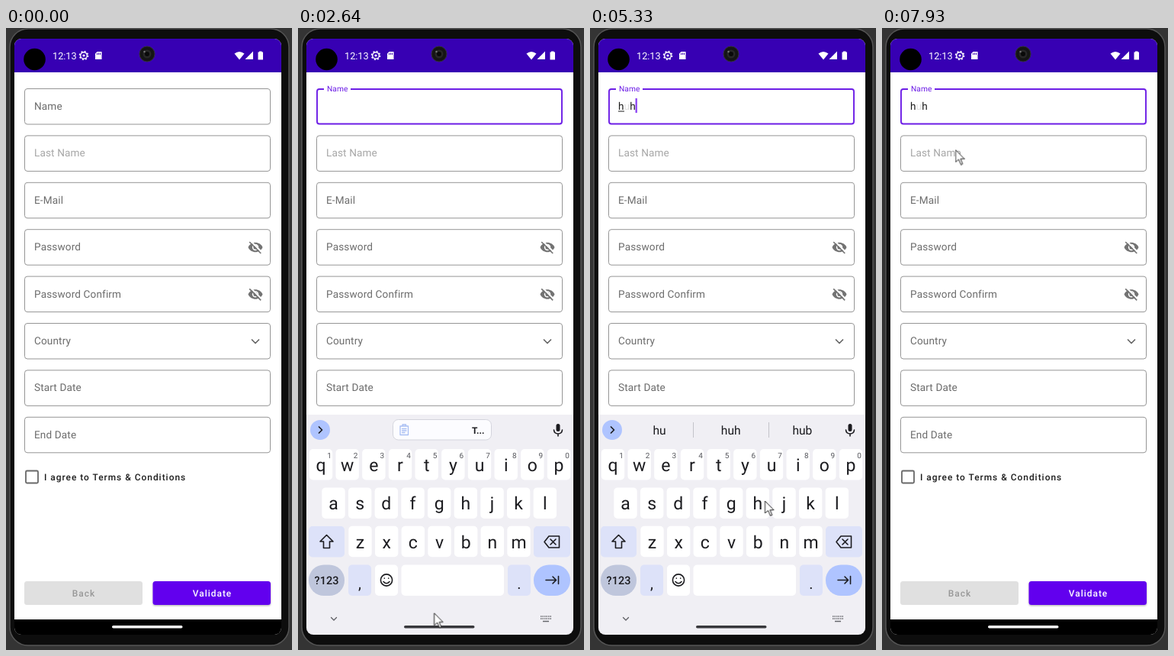
An HTML page for the animation above (8000 ms loop, 375 px wide and 814 px high).

```html
<!DOCTYPE html>
<html lang="en">
<head>
<meta charset="utf-8">
<title>Form validation</title>
<style>
html, body { margin: 0; width: 100%; height: 100%; overflow: hidden; background: #111; }
svg { display: block; width: 100vw; height: 100vh; font: 13.6px Roboto, sans-serif; text-rendering: geometricPrecision; }
text { white-space: pre; }
.label { letter-spacing: .13px; fill: #6c6c6c; }
.button { font-size: 11.9px; font-weight: 500; letter-spacing: 1px; }
.line { fill: none; stroke-linecap: round; stroke-linejoin: round; }
.mid { text-anchor: middle; }
.key { font-size: 23px; fill: #1b1b1f; }
.digit { font-size: 10px; fill: #55565c; }
.hint { font-size: 15.6px; fill: #1b1b1f; }

/* One loop is 8 s, so 1% is 80 ms. */
.anim { animation: 8s linear infinite; }
.step { animation: 8s step-end infinite; }

#cursor { animation-name: cursor; }
@keyframes cursor {
  0%, 6.2% { transform: translate(-40px, 112px); }
  6.25% { transform: translate(13px, 111px); }
  7.1% { transform: translate(82px, 106px); }
  8%, 18.2% { transform: translate(122.5px, 116px); }
  19.4%, 28.5% { transform: translate(110.5px, 112px); }
  32.5% { transform: translate(172px, 788px); }
  36.4%, 39.4% { transform: translate(222px, 618px); }
  41.6% { transform: translate(242px, 589px); }
  43.5%, 55% { transform: translate(239px, 577px); }
  58%, 70% { transform: translate(229.5px, 619px); }
  74.4% { transform: translate(110px, 793px); }
  78.4%, 88.5% { transform: translate(51.5px, 776px); }
  90.4% { transform: translate(60px, 755px); }
  97.3%, 99% { transform: translate(96.5px, 189px); }
  99.1%, 100% { transform: translate(96.5px, 159.5px); }
}
#idle { animation-name: idle; }
@keyframes idle {
  0% { stroke: #959595; opacity: 1; }
  12% { stroke: #686868; opacity: 1; }
  14%, 100% { opacity: 0; }
}
#focus { animation-name: focus; }
@keyframes focus {
  0% { opacity: 0; }
  14%, 100% { opacity: 1; }
}
#focus path { animation-name: outline; }
@keyframes outline {
  0%, 41.6% { stroke: #6d1ee6; }
  43.5%, 63.5% { stroke: #b00020; }
  65.5%, 100% { stroke: #6d1ee6; }
}
#name { animation-name: float; }
@keyframes float {
  0%, 12.6% { transform: translate(37px, 107px); fill: #6c6c6c; animation-timing-function: ease-in-out; }
  14.6%, 41.6% { transform: translate(38px, 83px) scale(.75); fill: #6d1ee6; }
  43.5%, 63.5% { transform: translate(38px, 83px) scale(.75); fill: #b00020; }
  65.5%, 100% { transform: translate(38px, 83px) scale(.75); fill: #6d1ee6; }
}
#caret { animation-name: caret; }
@keyframes caret {
  0% { opacity: 0; transform: none; fill: #6200ee; }
  11.7% { opacity: 1; }
  18.25% { opacity: 0; }
  24.5% { opacity: 1; }
  30.7% { opacity: 0; }
  36.3% { opacity: 1; transform: none; fill: #6200ee; }
  39.2% { opacity: 1; transform: translate(7.5px); fill: #b00020; }
  47.75% { opacity: 0; }
  54% { opacity: 1; transform: translate(7.5px); }
  58.2% { opacity: .15; transform: translate(15px); }
  59.7% { opacity: 1; transform: translate(15px); fill: #b00020; }
  63% { opacity: 1; transform: translate(22.5px); fill: #6200ee; }
  70% { opacity: 0; }
  76.2% { opacity: 1; }
  82.4% { opacity: 0; }
  88.6% { opacity: 1; }
  94.9%, 100% { opacity: 0; transform: translate(22.5px); fill: #6200ee; }
}
#first { animation-name: first; }
@keyframes first { 0% { opacity: 0; } 39.2%, 100% { opacity: 1; } }
#second { animation-name: second; }
@keyframes second { 0% { opacity: 0; } 58.2%, 100% { opacity: .13; } }
#third { animation-name: third; }
@keyframes third { 0% { opacity: 0; } 63%, 100% { opacity: 1; } }
#underline, #divider { animation-name: composing; }
@keyframes composing { 0% { opacity: 0; } 39.2% { opacity: 1; } 80.1%, 100% { opacity: 0; } }
#error { animation-name: error; }
@keyframes error { 0% { opacity: 0; } 40.6% { opacity: 1; } 63.6%, 100% { opacity: 0; } }
#rest { animation-name: shift; }
@keyframes shift { 0% { transform: none; } 40.6% { transform: translateY(23px); } 63.6%, 100% { transform: none; } }
#keyboard { animation-name: slide; }
@keyframes slide {
  0%, 13.8% { transform: translateY(290px); animation-timing-function: ease-out; }
  16.4%, 82.5% { transform: none; animation-timing-function: ease-in; }
  86.5%, 100% { transform: translateY(290px); }
}
#handle { animation-name: handle; }
@keyframes handle {
  0%, 15% { fill: #fff; }
  16.5% { fill: #d4d3d8; }
  20% { fill: #c2c1c6; }
  25.2%, 84% { fill: #38383c; }
  90% { fill: #777; }
  97.3%, 100% { fill: #fff; }
}
#chip { animation-name: chip; }
@keyframes chip { 0% { opacity: 1; } 39.2% { opacity: 0; } 80.1%, 100% { opacity: 1; } }
#hints { animation-name: hints; }
@keyframes hints { 0% { opacity: 0; } 39.2% { opacity: 1; } 58.2%, 100% { opacity: 0; } }
#next { animation-name: next; }
@keyframes next { 0% { opacity: 0; } 58.2% { opacity: .06; } 62.2% { opacity: 1; } 80.1%, 100% { opacity: 0; } }
#key-u { animation-name: press; }
@keyframes press { 0% { opacity: 1; } 58% { opacity: .1; } 60%, 100% { opacity: 1; } }
#ripple { animation-name: ripple; }
@keyframes ripple { 0%, 80% { opacity: 0; } 80.8%, 81.6% { opacity: 1; } 84%, 100% { opacity: 0; } }
</style>
</head>
<body>
<svg viewBox="0 0 375 814" preserveAspectRatio="none">
  <defs>
    <clipPath id="screen"><rect x="11" y="14" width="350" height="780" rx="9"/></clipPath>
    <filter id="shadow" x="-10%" y="-20%" width="120%" height="160%">
      <feDropShadow dx="0" dy="1.2" stdDeviation="1" flood-opacity=".3"/>
    </filter>
    <g id="eye">
      <path d="M-9.5 0C-6-8.3 6-8.3 9.5 0C6 8.3-6 8.3-9.5 0Z" fill="#737373"/>
      <circle r="4.2" fill="#fff"/><circle r="2.6" fill="#737373"/>
      <path d="M-6.2-8.2L8.8 6.8" stroke="#fff" stroke-width="2"/>
      <path d="M-7.8-7L7.2 8" stroke="#737373" stroke-width="1.7"/>
    </g>
  </defs>

  <rect width="375" height="814" fill="#343434"/>
  <rect x="5" y="1" width="366" height="807" rx="24" fill="#0d0d0d" stroke="#555" stroke-width="1.5"/>

  <g clip-path="url(#screen)">
    <rect x="11" y="14" width="350" height="780" fill="#fff"/>
    <rect x="11" y="14" width="350" height="44" fill="#3700b3"/>
    <rect x="11" y="774" width="350" height="20"/>

    <g id="rest" class="step">
      <g id="fields"></g>
      <rect x="26" y="579.5" width="16" height="16" rx="1.5" fill="none" stroke="#686868" stroke-width="1.8"/>
      <text class="button" x="50" y="592" fill="#1c1c1c">I agree to Terms &amp; Conditions</text>
    </g>

    <rect x="24" y="724" width="155" height="31" rx="3.5" fill="#e0e0e0"/>
    <text class="button mid" x="102" y="744.3" fill="#979797">Back</text>
    <rect x="192.5" y="724" width="154.5" height="31" rx="3.5" fill="#6200ee" filter="url(#shadow)"/>
    <text class="button mid" x="270.5" y="744.3" fill="#fff">Validate</text>

    <rect id="idle" class="step" x="24.5" y="79.5" width="322" height="46.5" rx="3.5" fill="none"/>
    <g id="focus" class="step">
      <path class="anim" d="M34 80H28Q25 80 25 83V122.5Q25 125.5 28 125.5H343Q346 125.5 346 122.5V83Q346 80 343 80H69" fill="none" stroke-width="1.9"/>
    </g>
    <text id="name" class="label anim">Name</text>
    <g fill="#1c1c1c">
      <text id="first" class="step" x="37" y="107">h</text>
      <text id="second" class="step" x="44.6" y="107">u</text>
      <text id="third" class="step" x="52.2" y="107">h</text>
      <rect id="underline" class="step" x="37" y="108.5" width="8" height="1"/>
    </g>
    <rect id="caret" class="step" x="37.4" y="92" width="1.7" height="19"/>
    <text id="error" class="step" x="30.7" y="143" font-size="11.7" fill="#b00020">This field doesn't match the min-length requirement.</text>

    <g id="keyboard" class="anim">
      <rect x="11" y="506" width="350" height="289" fill="#f0eff4"/>
      <circle cx="29" cy="526" r="13" fill="#afc4ff"/>
      <path class="line" d="M27.5 522L31.5 526L27.5 530" stroke="#1b1b1f" stroke-width="1.7"/>
      <g id="chip" class="step">
        <rect x="124.5" y="512.5" width="129" height="26.5" rx="7" fill="#fcfcff" stroke="#d3d4dc"/>
        <path class="line" d="M134 521H144.5V532.5H134ZM137 521V519H141.5V521M136.5 524.5H142M136.5 527H142M136.5 529.5H140" stroke="#a9bff3" stroke-width="1.3"/>
        <text x="228" y="531" font-size="12" font-weight="700" fill="#1b1b1f">T...</text>
      </g>
      <rect id="divider" class="step" x="135" y="516" width="1" height="20" fill="#c3c3c9"/>
      <g id="hints" class="step"></g>
      <g id="next" class="step"></g>
      <rect x="338.5" y="518" width="5" height="10" rx="2.5" fill="#1b1b1f"/>
      <path class="line" d="M335.5 526Q336 531 341 531T346.5 526M341 531V534" stroke="#1b1b1f" stroke-width="1.6"/>
      <g id="keys"></g>
      <g class="line" stroke="#1b1b1f" stroke-width="1.6">
        <path d="M37.5 663.5L46 672H41.5V680.5H33.5V672H29Z"/>
        <path d="M329 665H342.5V680H329L323 672.5ZM331 669L338 676M338 669L331 676"/>
        <circle cx="116" cy="722.5" r="7.6"/>
        <path d="M112 724.5Q116 729 120 724.5M113.3 720V720.2M118.7 720V720.2"/>
        <path d="M325 722.5H338M334 718L338.5 722.5L334 727M341.5 717.5V727.5"/>
      </g>
      <rect id="ripple" class="anim" x="18.5" y="753" width="56" height="41" rx="20.5" fill="#d6d5da"/>
      <path class="line" d="M43.5 771.5L47 775L50.5 771.5" stroke="#5f6065" stroke-width="1.3"/>
      <path d="M318 770H332M318 773H332" stroke="#66676c" stroke-width="1.5" stroke-dasharray="1.5 1"/>
      <path d="M321 776.5H329" stroke="#66676c" stroke-width="1.5"/>
    </g>
    <rect id="handle" class="anim" x="139" y="782" width="92.5" height="3.5" rx="1.75"/>

    <circle cx="37.5" cy="41" r="14.3"/>
    <circle cx="185" cy="34" r="10" fill="#151515" stroke="#333"/>
    <circle cx="185" cy="34" r="5.5" fill="#272727"/>
    <circle cx="185" cy="34" r="3" fill="#090909"/>
    <circle cx="181.5" cy="31" r="1.2" fill="#777"/>
    <g fill="#fff">
      <text x="61" y="41" font-size="12.7">12:13</text>
      <circle cx="102" cy="36" r="4.3" fill="none" stroke="#fff" stroke-width="1.4"/>
      <circle cx="102" cy="36" r="5.5" fill="none" stroke="#fff" stroke-width="1.6" stroke-dasharray="2 2.32"/>
      <circle cx="102" cy="36" r="1.6"/>
      <path d="M119.5 31H125.5V41H117V33.5Z"/>
      <path d="M119.5 33V35M121.5 32.5V35M123.5 32.5V35" stroke="#3700b3"/>
      <path d="M299.5 33.5Q306 28.5 312.5 33.5L306 41.5Z"/>
      <path d="M324 30.5V41H313.5Z"/>
      <path d="M332 30.5H335.5V31.5H337V41.5H330.5V31.5H332Z"/>
    </g>
  </g>

  <path id="cursor" class="anim" d="M0 0V16L4 12.5L7 19.3L9.3 18.3L6.5 11.8H11.5Z" fill="#fff" stroke="#222" stroke-linejoin="round"/>
</svg>
<script>
const fill = (id, html) => { document.getElementById(id).innerHTML = html; };
const key = (x, y, w, color, r = 5) =>
  `<rect x="${x}" y="${y}" width="${w}" height="40.5" rx="${r}" fill="${color}"/>`;

const labels = ["Last Name", "E-Mail", "Password", "Password Confirm", "Country", "Start Date", "End Date"];
fill("fields", labels.map((label, i) => {
  const y = 79.5 + 61.4 * (i + 1);
  const icon = label.startsWith("Password") ? `<use href="#eye" x="327" y="${y + 23.3}"/>`
    : label === "Country" ? `<path class="line" d="M322.5 ${y + 21.5}l4.5 4.5l4.5-4.5" stroke="#666" stroke-width="1.7"/>` : "";
  const tone = i ? "" : ' style="fill:#a6a6a6"';
  return `<rect x="24.5" y="${y}" width="322" height="46.5" rx="3.5" fill="none" stroke="#959595"/>
    <text class="label" x="37" y="${y + 27.5}"${tone}>${label}</text>${icon}`;
}).join(""));

const hints = words => words.map((word, i) =>
  `<text class="hint mid" x="${91 + 93.7 * i}" y="531.5">${word}</text>`).join("") +
  '<rect x="234" y="516" width="1" height="20" fill="#c3c3c9"/>';
fill("hints", hints(["h", "hey", "how"]));
fill("next", hints(["hu", "huh", "hub"]));

const pitch = 34.67;
const rows = [["qwertyuiop", 30], ["asdfghjkl", 46.5], ["zxcvbnm", 81.5]];
const letters = rows.map(([row, start], r) => [...row].map((letter, i) => {
  const x = start + pitch * i, y = 551 + 50.4 * r;
  const digit = r ? "" : `<text class="digit mid" x="${x + 11}" y="${y + 11.5}">${(i + 1) % 10}</text>`;
  return key(x - 15.2, y, 30.4, "#fff") +
    `<g${letter === "u" ? ' id="key-u" class="step"' : ""}><text class="key mid" x="${x}" y="${y + 29}">${letter}</text>${digit}</g>`;
}).join("")).join("");
const soft = "#dde2f9";
fill("keys", letters +
  key(14, 652, 47, soft) + key(309, 652, 48, soft) +
  key(14, 702.5, 47, "#bfc6dc", 20) + key(66, 702.5, 30, soft) + key(101, 702.5, 30, "#fff") +
  key(135.5, 702.5, 134.5, "#fff") + key(275, 702.5, 30, soft) + key(309, 702.5, 48, "#afc4ff", 20) +
  `<text class="mid" x="37.5" y="728" font-size="14.5" font-weight="500" fill="#1b1b1f">?123</text>
  <text class="key mid" x="81" y="734" style="font-size:20px">,</text>
  <text class="key mid" x="290" y="734" style="font-size:20px">.</text>`);
</script>
</body>
</html>
```
